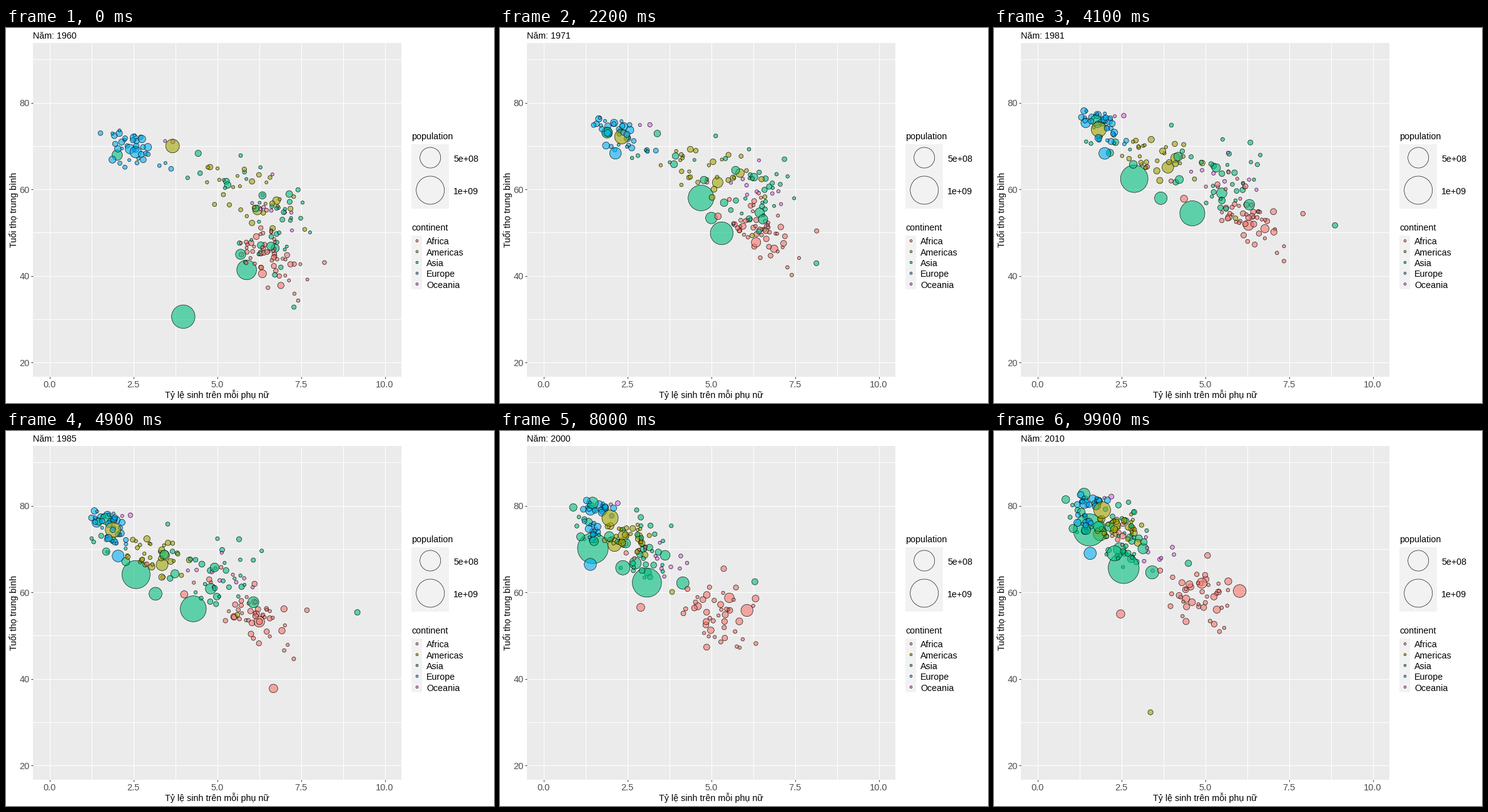
A matplotlib script for the animation above (10000 ms loop, 780x600 px).

```python
import numpy as np
import matplotlib.pyplot as plt
from matplotlib.animation import FuncAnimation
from matplotlib.patches import Circle, Rectangle

W, H, DPI, FRAMES = 780, 600, 100, 100
PX = 72 / DPI
OUTLINE = 0.62 * PX
LOW_LIFE = 20  # lower values drop out of the plot
CONTINENTS = {"Africa": "#F8766D", "Americas": "#A3A500", "Asia": "#00BF7D",
              "Europe": "#00B0F6", "Oceania": "#E76BF3"}
AF, AM, AS, EU, OC = CONTINENTS.values()

rng = np.random.default_rng(11)
t = np.linspace(0, 1, FRAMES)
year = 1960 + 50 * t
large, small = [], []


def px_x(fertility):
    return 69.5 + 53.6 * np.asarray(fertility)


def px_y(life):
    return 119.5 + 6.93 * (80 - np.asarray(life))


def radius(millions):
    return 2.1 + 0.645 * np.sqrt(millions)


def transition(mid, span=6):
    """S-curve from 0 to 1 over the whole period, steepest at year mid."""
    s = 1 / (1 + np.exp((mid - year) / span))
    return (s - s[0]) / (s[-1] - s[0])


def make_dot(color, pops, fertility, life):
    pop = pops[0] + (pops[1] - pops[0]) * t
    life = np.where(life < LOW_LIFE, np.nan, life)
    return color, px_x(fertility), px_y(life), radius(pop)


def country(color, pops, start, end, mid, shock=(1960, 1, 0), span=6):
    """Fertility falls on an S-curve, life expectancy rises and levels off."""
    when, length, drop = shock
    fertility = start[0] + (end[0] - start[0]) * transition(mid, span)
    life = start[1] + (end[1] - start[1]) * t ** 0.7
    life = life - drop * np.clip(1 - abs(year - when) / length, 0, 1)
    return make_dot(color, pops, fertility, life)


def route(color, pops, *keys):
    """A country with an irregular course through (year, fertility, life)."""
    when, fertility, life = zip(*keys)
    return make_dot(color, pops, np.interp(year, when, fertility),
                    np.interp(year, when, life))


def region(color, n, max_pop, growth, start, spread0, end, spread1, mid, crisis=0):
    """Countries scattered around a shared course."""
    for _ in range(n):
        a, b, c, d = np.clip(rng.normal(size=4), -1.8, 1.8)
        z0 = np.array((a, 0.8 * b - 0.5 * a))
        z1 = 0.6 * z0 + 0.7 * np.array((c, d))
        pop = 0.3 + max_pop * rng.random() ** 3
        shock = 2002, 12, crisis * rng.random() ** 2
        small.append(country(color, (pop, pop * growth), start + spread0 * z0,
                             end + spread1 * z1, mid + rng.normal(0, 4), shock))


# Populous countries and those with a course of their own
large += [
    country(AS, (48, 151), (6.73, 46.4), (2.45, 70), 1986),
    country(AM, (72, 195), (6.2, 55.2), (1.87, 73.5), 1978, span=9),
    country(AS, (6, 14), (6.9, 42), (2.95, 67), 1985, shock=(1976.6, 3.5, 45)),
    route(AS, (667, 1340), (1960, 3.99, 30.6), (1963, 7.4, 47), (1966, 6.22, 55.4),
          (1976, 3.24, 60.5), (1993, 1.96, 67.5), (2000, 1.47, 70), (2010, 1.55, 74.4)),
    country(AF, (22, 87), (6.9, 37.8), (4.9, 62.1), 1998, shock=(1985, 2, 17)),
    country(EU, (73, 82), (2.4, 69.3), (1.4, 80.5), 1971, span=3),
    country(AM, (4, 10), (6.3, 42), (3.37, 63), 1992, shock=(2010, 1, 30.7)),
    country(AS, (450, 1231), (5.88, 41.4), (2.57, 65.6), 1986, span=14),
    country(AS, (88, 241), (5.7, 45), (2.3, 69), 1978),
    country(AS, (93, 127), (2.02, 67.9), (1.39, 82.7), 1982, span=12),
    country(AM, (38, 117), (6.77, 57.4), (2.3, 75.6), 1978),
    country(AF, (45, 160), (6.35, 40.5), (6.03, 61.3), 1990, shock=(2002, 12, 3)),
    country(AS, (45, 170), (6.6, 46.9), (3.42, 64.6), 1995),
    country(AS, (26, 93), (7.15, 58.9), (3.15, 70.1), 1980, span=14),
    route(EU, (120, 143), (1960, 2.57, 68.6), (1976, 1.96, 68.2),
          (1985, 2.05, 68.4), (1995, 1.3, 65), (2010, 1.57, 69)),
    country(AF, (3, 11), (8.2, 43.1), (5, 64), 1995, shock=(1994, 0.6, 60)),
    route(AF, (17, 51), (1960, 6.17, 49.1), (1993, 3.3, 63),
          (2005, 2.65, 52.5), (2010, 2.48, 55)),
    country(AS, (27, 66), (6.15, 55.6), (1.45, 74.4), 1975),
    country(AS, (27, 72), (6.3, 47.1), (2.15, 75.2), 1979, span=10),
    route(AM, (187, 309), (1960, 3.67, 70), (1976, 1.75, 73.1), (1993, 2.03, 75.7),
          (2010, 1.93, 79)),
    country(AS, (33, 87), (6.35, 58.6), (1.82, 75.2), 1981),
    route(AS, (5, 23), (1960, 7.29, 32.8), (1985, 9.2, 55.6), (2010, 4.5, 66.7)),
]

# Everyone else
vec = np.array
region(AF, 43, 14, 2.8, vec((6.7, 43)), vec((0.55, 4.5)),
       vec((5.0, 59.5)), vec((0.75, 4)), 1994, crisis=13)
region(AF, 7, 15, 2.5, vec((6.5, 51)), vec((0.6, 6)),
       vec((2.4, 74)), vec((0.4, 2)), 1983)
region(AM, 29, 14, 2.3, vec((5.9, 58)), vec((0.95, 5)),
       vec((2.4, 74.5)), vec((0.4, 2.2)), 1976)
region(EU, 19, 55, 1.2, vec((2.6, 70.3)), vec((0.4, 1.7)),
       vec((1.75, 80.8)), vec((0.25, 1)), 1972)
region(EU, 17, 35, 1.1, vec((2.6, 67.5)), vec((0.6, 2.5)),
       vec((1.45, 76)), vec((0.15, 2.5)), 1985, crisis=5)
region(AS, 24, 12, 3, vec((6.6, 55)), vec((0.65, 6)),
       vec((2.5, 74)), vec((0.5, 3.5)), 1987)
region(AS, 8, 25, 2, vec((5.2, 64)), vec((0.6, 2.5)),
       vec((1.35, 79)), vec((0.25, 3)), 1972)
region(AS, 7, 20, 2.4, vec((6.3, 45)), vec((0.4, 5)),
       vec((2.8, 68)), vec((0.5, 2.5)), 1987)
region(OC, 9, 1.5, 2, vec((6.5, 57)), vec((0.5, 5)),
       vec((3.5, 69)), vec((0.5, 4)), 1985)
region(OC, 2, 10, 2, vec((3.5, 71)), vec((0.1, 0.2)),
       vec((2, 81.7)), vec((0.1, 0.5)), 1971)

# Spread the large dots evenly through the drawing order
rank = np.concatenate((np.linspace(0, 1, len(large)), rng.random(len(small))))
dots = large + small
colors, xs, ys, rs = zip(*(dots[k] for k in np.argsort(rank)))
xs, ys, rs = np.array(xs), np.array(ys), np.array(rs)

plt.rcParams["font.family"] = "Liberation Sans"
fig = plt.figure(figsize=(W / DPI, H / DPI), dpi=DPI, facecolor="white")
ax = fig.add_axes((0, 0, 1, 1))
ax.set(xlim=(0, W), ylim=(H, 0))
ax.axis("off")


def label(x, y, s, color="black", size=14.2, **kw):
    return ax.text(x, y, s, color=color, fontsize=size * PX, **kw)


def box(x0, y0, x1, y1, color):
    ax.add_patch(Rectangle((x0, y0), x1 - x0, y1 - y0, fc=color, ec="none", zorder=0))


def line(x, y, color="white"):
    ax.plot(x, y, color=color, lw=PX, zorder=1, solid_capstyle="butt")


# Panel, grid and axes
box(43, 24, 632, 558, "#EBEBEB")
for i in range(9):
    x = px_x(1.25 * i)
    line((x, x), (24, 558))
    if i % 2 == 0:
        line((x, x), (558, 561), "#333333")
        label(x, 575, f"{i * 1.25:.1f}", "#4D4D4D", 14.5, ha="center")
for life in range(20, 91, 10):
    y = px_y(life)
    line((43, 632), (y, y))
    if life % 20 == 0:
        line((40, 43), (y, y), "#333333")
        label(38, y + 5.5, f"{life}", "#4D4D4D", 14.5, ha="right")
label(337, 592, "Tỷ lệ sinh trên mỗi phụ nữ", ha="center")
label(20, 291, "Tuổi thọ trung bình", rotation=90, ha="right", va="center")
title = label(43, 17, "")

# Legends
label(648, 178, "population")
box(648, 186, 708, 289, "#F2F2F2")
for y, pop, name in ((207.5, 500, "5e+08"), (259.5, 1000, "1e+09")):
    ax.add_patch(Circle((678.2, y), radius(pop), fill=False, ec="black", lw=OUTLINE))
    label(715, y + 6.5, name)
label(648, 324, "continent")
box(648, 332, 665, 418, "#F2F2F2")
for i, (name, color) in enumerate(CONTINENTS.items()):
    y = 340.5 + 17.3 * i
    ax.add_patch(Circle((657, y), 1.9, fc=(color, 0.6), ec="black", lw=OUTLINE))
    label(672, y + 6, name)

points = ax.scatter(xs[:, 0], ys[:, 0], s=(2 * rs[:, 0] * PX) ** 2,
                    facecolors=[(c, 0.6) for c in colors],
                    edgecolors="black", linewidths=OUTLINE, zorder=3)


def update(i):
    points.set_offsets(np.column_stack((xs[:, i], ys[:, i])))
    points.set_sizes((2 * rs[:, i] * PX) ** 2)
    title.set_text(f"Năm: {round(year[i])}")
    return points, title


anim = FuncAnimation(fig, update, frames=FRAMES, interval=100, repeat=True,
                     repeat_delay=0, init_func=lambda: update(0))
plt.show()
```
